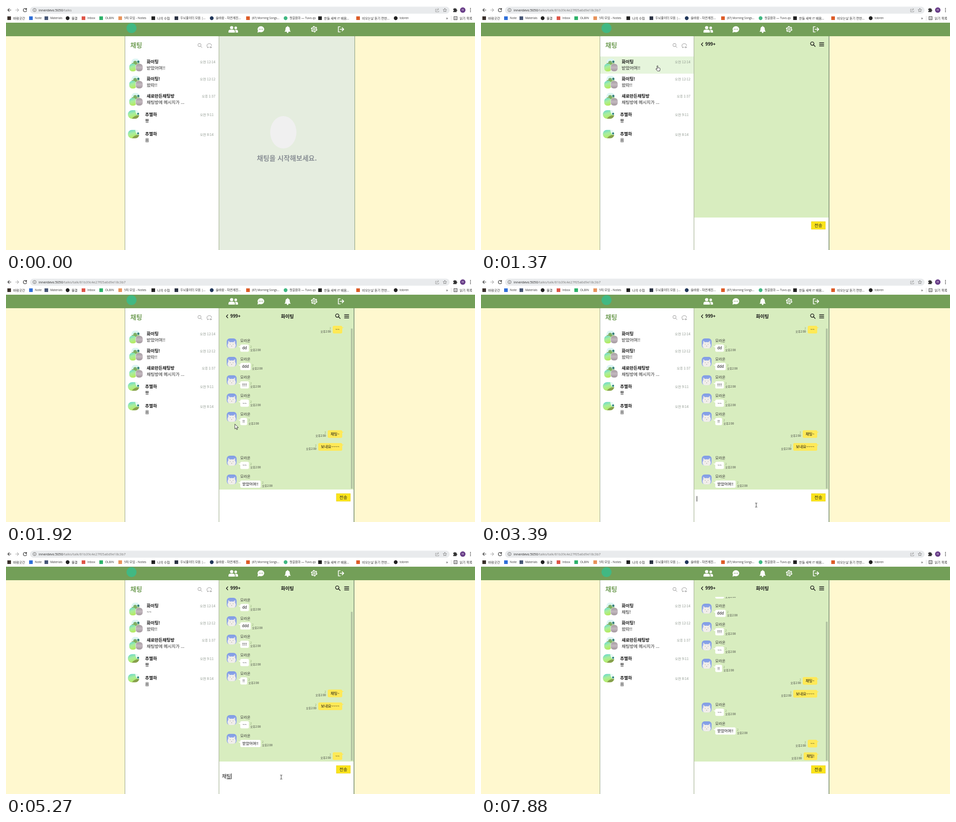
Recreate the animation shown at these times as an HTML page. Size 1035x541 px, loop 8000 ms.

```html
<!DOCTYPE html>
<html lang="ko">
<head>
<meta charset="utf-8">
<title>Chat</title>
<style>
html, body { margin: 0; width: 100%; height: 100%; overflow: hidden; background: #fff8cf; }
svg { display: block; width: 100vw; height: 100vh; }
text { font-family: "Noto Sans CJK KR", "Noto Sans KR", "Noto Sans CJK JP", "Noto Sans", sans-serif; white-space: pre; }
.ui { font-family: "Open Sans", "Noto Sans", "Noto Sans CJK KR", sans-serif; }
.b { font-weight: 700; }
.line { fill: none; stroke-linecap: round; stroke-linejoin: round; }
</style>
</head>
<body>
<svg id="stage" viewBox="0 0 1035 541">
  <defs>
    <linearGradient id="meadow" x2=".35" y2="1">
      <stop stop-color="#62d5d6"/><stop offset=".5" stop-color="#a9ee9c"/><stop offset="1" stop-color="#b5ea62"/>
    </linearGradient>
    <linearGradient id="stone" x2="0" y2="1">
      <stop stop-color="#a59ba0"/><stop offset=".5" stop-color="#c3b8bf"/><stop offset="1" stop-color="#a0949b"/>
    </linearGradient>
    <linearGradient id="sky" x2="0" y2="1"><stop stop-color="#7f9be6"/><stop offset="1" stop-color="#a3b5ea"/></linearGradient>
    <clipPath id="oval"><rect width="25" height="19" rx="9"/></clipPath>
    <clipPath id="disc"><rect x="5" width="18" height="16" rx="7.5"/></clipPath>
    <clipPath id="face"><rect width="22" height="22" rx="7"/></clipPath>
    <clipPath id="log"><rect x="471" y="104" width="296" height="365"/></clipPath>
    <g id="group">
      <g clip-path="url(#disc)">
        <rect x="5" width="18" height="16" fill="#dcf5f3"/>
        <circle cx="13" cy="9" r="4" fill="#7bb069"/><circle cx="20" cy="7" r="2.500" fill="#377e77"/>
        <rect x="5" y="10" width="18" height="6" fill="#84b05b"/>
      </g>
      <rect y="11.500" width="16" height="17" rx="6.500" fill="url(#meadow)"/>
      <rect x="14" y="11.500" width="16" height="17" rx="6.500" fill="url(#stone)" stroke="#fff" stroke-width=".6"/>
    </g>
    <g id="single" clip-path="url(#oval)">
      <rect width="25" height="19" fill="url(#meadow)"/>
      <path d="M16 0h9v12q-7 0-9-12z" fill="#e9f9f7"/>
      <circle cx="22.500" cy="8" r="2.200" fill="#2b7f7a"/>
      <path d="M9 19q5-8 16-8v8z" fill="#87a04d"/>
    </g>
    <g id="cat" clip-path="url(#face)">
      <rect width="22" height="22" fill="url(#sky)"/>
      <path d="M3.500 22V5l4.500 4h6l4.500-4v17z" fill="#ebe7e4"/>
      <ellipse cx="11" cy="15.500" rx="9" ry="7.500" fill="#f1eeeb"/>
      <path d="M7 13h1.500m5 0H15m-5 4h2" stroke="#a39c96"/>
    </g>
  </defs>
  <g id="base"></g>
  <rect id="hover" x="263" width="206.500" fill="#e6f5dc"/>
  <g id="rooms"></g>
  <g id="empty"></g>
  <g id="chat"></g>
  <g id="pointer" class="line" stroke="#222" stroke-width=".9">
    <path id="arrow" d="M0 0v10.500l2.500-2.200 1.700 3.900 1.700-.8-1.700-3.700h3.300z" fill="#fff"/>
    <path id="hand" d="M0 .8q1-1.200 1.800 0v4l4 .9q1.300.5 1 2l-.9 4.500h-5L-2.400 8.300q-.5-1.500 1-1.300L0 8z" fill="#fff"/>
    <path id="beam" d="M-2-4.500h1.300L0-4l.7-.5H2M0-4v8M-2 4.500h1.300L0 4l.7.500H2"/>
  </g>
</svg>
<script>
const $ = id => document.getElementById(id);
const text = (x, cy, s, size, attrs = "") =>
  `<text x="${x}" y="${(cy + size * .36).toFixed(2)}" font-size="${size}" ${attrs}>${s}</text>`;
const rect = (x, y, w, h, fill, attrs = "") =>
  `<rect x="${x}" y="${y}" width="${w}" height="${h}" fill="${fill}" ${attrs}/>`;
const circle = (x, y, r, fill, attrs = "") => `<circle cx="${x}" cy="${y}" r="${r}" fill="${fill}" ${attrs}/>`;
const line = (d, color, w = 1) => `<path class="line" d="${d}" stroke="${color}" stroke-width="${w}"/>`;
const shape = (d, fill) => `<path d="${d}" fill="${fill}"/>`;
const show = (id, on) => $(id).style.display = on ? "" : "none";
const END = 'text-anchor="end"', MID = 'text-anchor="middle"', BOLD = 'class="b"';

// Browser bar
const bookmarks = [
  [7, "#3a302c", "바람곳간", 7.2], [55, "#2f6fd8", "Note", 6.6], [89, "#465676", "Materials", 6.2],
  [136, "#222", "물결", 7.2, 1], [171, "#de5548", "Inbox", 6.6], [210, "#2db26a", "OLBIN", 6.6],
  [252, "#e8935b", "5차 모임 - Notes", 6.8], [325, "#222", "나의 수첩", 7.1], [376, "#2c3344", "두뇌풀이터 모음 |...", 6.7],
  [454, "#22385c", "솔바람 - 자연계진...", 6.9, 1], [534, "#dd5c28", "(87) Morning Songs...", 6.2],
  [617, "#41b883", "첫걸음마 — Tuvo.qs", 6.6, 1], [693, "#222", "한들 새싹 IT 배움...", 7],
  [777, "#dd5c28", "비오는날 듣기 편한...", 7], [860, "#222", "tobren", 6.4, 1]
];
function browser() {
  const ink = "#333", gray = "#888";
  return rect(0, 0, 1035, 37, "#fff") + rect(53, 1.5, 926, 15.5, "#e9ebed", 'rx="7.75"')
    + line("M11 9H4m3.300-3.300L4 9l3.300 3.300", ink, 1.2) + line("M21 9h7m-3.300-3.300L28 9l-3.300 3.300", "#aaa", 1.1)
    + line("M44.700 6.700A3.700 3.700 0 1 0 45.500 10M45.500 5v2.700h-2.700", ink, 1.2)
    + circle(63, 9, 3.6, "none", 'stroke="#666" stroke-width=".9"') + line("M63 8.800v2M63 7.100v.1", "#666", .9)
    + text(72, 9, 'innerdevs:5050<tspan id="path" fill="#777"></tspan>', 7.55, 'class="ui" fill="#222"')
    + line("M950 7h-2v6h7v-2M950.500 10.500q.5-3.500 4-3.500m-1.700-2 2 2-2 2", gray, .8)
    + line("M968.500 5.300l1.200 2.500 2.700.4-2 1.900.5 2.700-2.400-1.300-2.400 1.300.5-2.700-2-1.900 2.700-.4z", "#666", .8)
    + shape("M987 6h2.500q0-1.800 1.200-1.800T992 6h2.400v2.500q1.600.1 1.600 1.300t-1.600 1.200v2.500H987V11q1.500 0 1.500-1.200T987 8.500z", ink)
    + circle(1008, 9, 6, "#673b87") + text(1008, 9, "H", 6, MID + ' fill="#fff"')
    + [5.5, 9, 12.5].map(y => circle(1025, y, 1, ink)).join("")
    + bookmarks.map(([x, color, name, size, round]) =>
        (round ? circle(x, 27, 4.2, color) : rect(x - 4, 23, 8, 8, color)) + text(x + 8.7, 27, name, size, 'class="ui" fill="#333"')).join("")
    + text(971, 26.5, "»", 9, 'class="ui" fill="#333"') + line("M982.500 22v10", "#ccc", .6)
    + rect(988.500, 23.500, 7, 7, "none", 'stroke="#444"') + line("M990 26h4m-4 2.500h4", "#444", .7)
    + text(1001, 27, "읽기 목록", 7.1, 'fill="#333"');
}

function navbar() {
  const w = "#fff", g = "#739f58";
  return rect(0, 37, 1035, 30, g) + circle(277, 49, 11, "#41b883")
    + circle(498, 48, 3.6, w) + shape("M491 59v-2.500q0-4 4-4h6q4 0 4 4V59z", w)
    + circle(507, 48.500, 2.900, w) + shape("M506.500 59v-3q0-2-1.500-3.300h3.500q3.500 0 3.500 3.600V59z", w)
    + `<ellipse cx="562.500" cy="51.500" rx="7.300" ry="6.700" fill="${w}"/>` + shape("M556 54l-1 5 5-1.500z", w)
    + [559, 562.500, 566].map(x => circle(x, 51.5, 1, g)).join("")
    + shape("M614.500 57q2.300-2 2.300-6 0-4.700 4-5.300v-1.500h1.400v1.500q4 .6 4 5.300 0 4 2.300 6z", w) + circle(621.500, 58, 1.9, w)
    + circle(680, 51.500, 5, "none", `stroke="${w}" stroke-width="1.500"`)
    + circle(680, 51.500, 6.3, "none", `stroke="${w}" stroke-width="1.500" stroke-dasharray="3.300 3.300"`)
    + circle(680, 51.500, 2, "none", `stroke="${w}" stroke-width="1.300"`)
    + line("M737.500 46h-4v11.500h4M737.500 51.700h7.500m-3.200-3.500 3.500 3.500-3.500 3.500", w, 1.7);
}

const EDGE = "#8fa184";
$("base").innerHTML = rect(0, 0, 1035, 541, "#fff8cf") + browser() + navbar()
  + rect(263, 67, 207, 474, "#fff") + text(274.500, 87, "채팅", 14, BOLD + ' fill="#739f58"')
  + circle(427, 86.500, 3.5, "none", 'stroke="#888" stroke-width=".9"') + line("M429.600 89.200l3 3", "#888", .9)
  + line("M448 91.500h-2l-1.500 1.500v-2q-1-1-1-3 0-4.500 5.200-4.500 5 0 5 4.200M450 91.500h4m-2-2v4", "#888", .9);

// Room list
const rooms = [
  ["화이팅", "받았어여!!", "오전 12:14", 123.5], ["화이팅!", "왔따!!", "오전 12:12", 161.500],
  ["새로만든채팅방", "채팅방에 메시지가 ...", "오후 1:37", 199.500],
  ["추별하", "뿅", "오전 9:11", 240.5, 1], ["추별하", "욥", "오전 8:14", 284, 1]
];
const rowEdges = [112, 150, 188, 226, 270, 314];
$("rooms").innerHTML = rooms.map(([name, last, time, y, solo], i) => {
  const x = solo ? 307 : 310.5;
  return `<use href="#${solo ? "single" : "group"}" x="${solo ? 269 : 272}" y="${y - (solo ? 9.5 : 7)}"/>`
    + text(x, y, name, 9.5, BOLD + ' fill="#111"')
    + text(x, y + 13.6, last, 9.5, `fill="#222" id="last${i}"`)
    + text(solo ? 458 : 462, y + 1, time, 7.4, END + ' fill="#8b958b"');
}).join("") + rect(262, 67, 1, 474, EDGE) + rect(469.500, 67, 1.200, 474, EDGE);

$("empty").innerHTML = rect(470.700, 67, 298.300, 474, "#e5eddf") + rect(769, 67, 1.200, 474, EDGE)
  + '<ellipse cx="612" cy="280" rx="29" ry="36" fill="#f0f0f0"/>'
  + text(620, 337.500, "채팅을 시작해보세요.", 14.9, MID + ' class="b" fill="#8b9196"');

// Conversation
const stamp = (x, y, attrs) => text(x, y - 2.500, "2", 5.5, attrs + ' fill="#7d9a62"') + text(x, y + 4.200, "오후2:00", 6.1, attrs + ' fill="#333"');
function theirs(y, s, w) {
  return `<use href="#cat" x="487" y="${y - 21.5}"/>` + text(517, y - 16.500, "모라온", 8.1, 'fill="#333"')
    + shape(`M512 ${y - 4}h7v6q-2-4-7-6z`, "#fff") + rect(517, y - 8, w, 16, "#fff", 'rx="3"')
    + text(517 + w / 2, y, s, 8.2, MID + ' fill="#111"') + stamp(520 + w, y, "");
}
function mine(y, s, w) {
  return shape(`M746 ${y - 5}h-7v6q2-4 7-6z`, "#ffe957") + rect(742 - w, y - 8.500, w, 17, "#ffe957", 'rx="3"')
    + text(742 - w / 2, y, s, 8.2, MID + ' fill="#111"') + stamp(738 - w, y, END);
}
const replies = [["dd", 19], ["ddd", 23], ["!!!!", 19], ["~~", 19], ["!!", 15]];
$("chat").innerHTML = rect(470.700, 67, 297, 402, "#d8edbf") + rect(470.700, 469, 297, 72, "#fff")
  + rect(767, 67, 2, 474, EDGE)
  + line("M489.500 81.500l-3.200 3.500 3.200 3.500", "#111", 1.3) + text(495, 85, "999+", 9.6, BOLD + ' fill="#111"')
  + circle(731, 83.300, 3.7, "none", 'stroke="#111" stroke-width="1.400"') + line("M733.800 86l3.700 3.700", "#111", 1.5)
  + line("M747 81.500h9.500M747 85h9.500M747 88.500h9.500", "#111", 1.4)
  + '<g id="talk">' + text(621, 85.500, "화이팅", 10.4, MID + ' class="b" fill="#111"')
  + '<g clip-path="url(#log)"><g id="flow">' + mine(114.500, "~~", 21)
  + replies.map(([s, w], i) => theirs(155.500 + i * 40.7, s, w)).join("")
  + mine(346, "채팅~", 32) + mine(374.500, "보내요~~~~", 53)
  + theirs(415.500, "~~", 19) + theirs(457, "받았어여!!", 45)
  + '<g id="sent1">' + mine(485, "~~", 21) + '</g><g id="sent2">' + mine(513, "채팅!", 30) + "</g></g></g>"
  + rect(761, 112, 4, 355, "#b3c4a3", 'id="thumb" rx="1"') + "</g>"
  + rect(729, 478, 31, 17, "#fbe41c", 'stroke="#dfc800" stroke-width=".6"') + text(744.500, 486.500, "전송", 9.5, MID + ' fill="#222"')
  + text(476.500, 0, "", 11, 'id="draft" fill="#111"') + rect(476, 0, 1, .8, "#111", 'id="mark"')
  + rect(476, 0, 1, 12, "#111", 'id="caret"');

// Pointer moves: start, end, steps, from, to, easing power
const moves = [
  [200, 810, 10, [890, 500], [393, 170.500], 1.6],
  [880, 950, 2, [393, 170.500], [391, 163], 1],
  [1020, 1440, 7, [391, 163], [388.500, 131.500], 2.2],
  [1720, 2200, 8, [388.500, 131.500], [609, 496], 1.6],
  [2340, 2530, 4, [609, 496], [607.300, 503.500], 1.6],
  [6810, 7020, 4, [607.300, 503.500], [1085, 496], 1]
];
function pointerAt(t) {
  const m = moves.filter(m => t >= m[0] - .01).pop();
  if (!m || t >= 7020) return null;
  const [a, b, n, from, to, pow] = m;
  const k = Math.min(n - 1, Math.floor((t - a) / (b - a) * (n - 1) + .01));
  const p = 1 - (1 - (k + 1) / n) ** pow;
  return from.map((v, i) => v + (to[i] - v) * p);
}

// Input states: time, text, caret x (0 = hidden), start of the composing underline
const typing = [
  [0, "", 0], [2340, "", 476], [2860, "", 0], [3390, "", 476], [3860, "~", 481], [3990, "~~", 487], [4340, "", 476],
  [4870, "ㅊ", 487, 477], [4970, "채", 487, 477], [5070, "챝", 487, 477], [5170, "채티", 497, 487], [5270, "채팅", 497, 487],
  [5540, "채팅!", 503], [6070, "채팅!", 0], [6270, "", 476], [6810, "", 0], [7350, "", 476], [7880, "", 0]
];
const scrolls = [[0, 0], [4480, 3], [4540, 16.5], [4590, 28], [6410, 31.3], [6480, 45], [6550, 55.7]];
const at = (table, t) => table.filter(r => t >= r[0] - .01).pop();
const set = (id, attrs) => { for (const k in attrs) $(id).setAttribute(k, attrs[k]); };

function draw(t) {
  const open = t >= 1230, sent = (t >= 4480) + (t >= 6410);
  show("empty", !open);
  show("chat", open);
  show("talk", t >= 1790);
  $("path").textContent = open ? "/talks/talk/81b39c4e27f05a6d9e18c3b7" : "/talks";
  $("last0").textContent = ["받았어여!!", "~~", "채팅!"][sent];

  const shift = at(scrolls, t)[1], len = [355, 330, 308][sent];
  set("flow", { transform: `translate(0 ${-shift})` });
  show("sent1", sent > 0);
  show("sent2", sent > 1);
  set("thumb", { height: len, y: 467 - len - Math.max(0, sent * 27.85 - shift) * .86 });

  const [, s, cx, from] = at(typing, t), top = t < 4340 ? 483.500 : 495.500;
  $("draft").textContent = s;
  set("draft", { y: top + 10 });
  show("caret", cx);
  set("caret", { x: cx, y: top });
  show("mark", from);
  if (from) set("mark", { x: from, y: top + 11.5, width: cx - from });

  const p = pointerAt(t), [x, y] = p || [0, 0];
  const row = x > 263 && x < 470 ? rowEdges.findIndex((e, i) => y >= e && y < rowEdges[i + 1]) : -1;
  const beam = open && x > 471 && x < 767 && y > 469;
  show("hover", row >= 0);
  if (row >= 0) set("hover", { y: rowEdges[row], height: rowEdges[row + 1] - rowEdges[row] });
  show("pointer", p);
  set("pointer", { transform: `translate(${x} ${y})` });
  show("hand", row >= 0);
  show("beam", beam);
  show("arrow", row < 0 && !beam);
}

const start = performance.now();
function tick() {
  draw((performance.now() - start) % 8000);
  requestAnimationFrame(tick);
}
tick();
</script>
</body>
</html>
```
